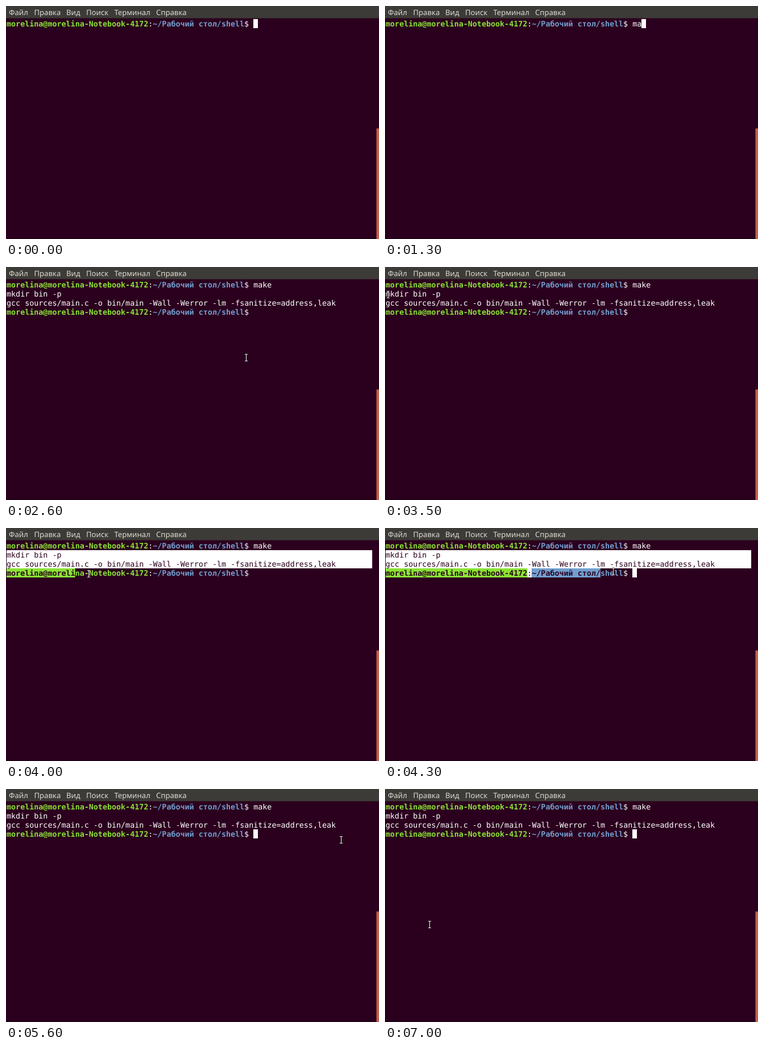
An HTML page for the animation above (7100 ms loop, 656x410 px).

```html
<!DOCTYPE html>
<html lang="ru">
<head>
<meta charset="utf-8">
<title>Терминал</title>
<style>
  html, body { margin: 0; width: 100%; height: 100%; overflow: hidden; background: #2b001e; }
  svg { display: block; }
  text { white-space: pre; text-rendering: geometricPrecision; }
  .menu { font: 13.1px "Noto Sans", "Open Sans", sans-serif; fill: #dfdbd2; }
  .term { font: 13.36px "DejaVu Sans Mono", monospace; }
  .bold { font-weight: bold; }
</style>
</head>
<body>
<svg id="stage" width="656" height="410" viewBox="0 0 656 410"></svg>
<script>
const LOOP = 7100, STEP = 100;
const CELL = 8.04, LINE = 16, ASCENT = 13, LEFT = 1, TOP = 23, COLUMNS = 80;
const BACK = '#2b001e', WHITE = '#ffffff', GREEN = '#8ae234', BLUE = '#729fcf';

const KEYS = [1100, 1300, 1400, 1600];
const ENTER = 1700, OUTPUT = 1800, DONE = 2400;
const SELECT_START = 3600, SELECT_END = 5000, SELECT_LAG = 26;
const COMMAND = 'make';
const PROMPT = [
  ['morelina@morelina-Notebook-4172', GREEN],
  [':', WHITE],
  ['~/Рабочий стол/shell', BLUE],
  ['$ ', WHITE]
];
const PROMPT_COLS = PROMPT.reduce((n, [s]) => n + s.length, 0);

// time, x, y of the mouse pointer
const POINTER = [
  [2200, 506, 240], [2300, 506, 238], [2500, 422, 160], [2800, 422, 160],
  [3300, 6, 49], [3600, 5, 49], [3900, 60, 82], [4300, 401, 77],
  [4600, 589, 84], [5000, 589, 90], [5600, 589, 90], [6000, 605, -10],
  [6700, 605, -10], [6800, 602, 8], [6900, 380, 110], [7000, 78, 239]
];

const stage = document.getElementById('stage');
const colX = col => LEFT + col * CELL;
const rowY = row => TOP + row * LINE;

function add(tag, attrs, parent = stage) {
  const node = document.createElementNS('http://www.w3.org/2000/svg', tag);
  for (const key in attrs) node.setAttribute(key, attrs[key]);
  parent.appendChild(node);
  return node;
}

function rect(x, y, width, height, fill, parent) {
  return add('rect', { x, y, width, height, fill }, parent);
}

function write(str, col, row, fill, parent, bold) {
  const node = add('text', {
    x: colX(col), y: rowY(row) + ASCENT, fill, class: bold ? 'term bold' : 'term'
  }, parent);
  node.textContent = str;
  return node;
}

function writePrompt(row, parent, inverted) {
  let col = 0;
  for (const [str, color] of PROMPT) {
    if (inverted) rect(colX(col), rowY(row), str.length * CELL, LINE, color, parent);
    write(str, col, row, inverted ? BACK : color, parent, color !== WHITE);
    col += str.length;
  }
}

function writeOutput(parent, fill) {
  write('mkdir bin -p', 0, 1, fill, parent);
  write('gcc sources/main.c -o bin/main -Wall -Werror -lm -fsanitize=address,leak', 0, 2, fill, parent);
}

function show(node, visible) {
  node.setAttribute('visibility', visible ? 'visible' : 'hidden');
}

rect(0, 0, 656, 410, BACK);
rect(0, 408, 656, 2, '#200317');
rect(651.5, 215.5, 4.5, 194.5, '#c4604a');
rect(0, 0, 656, 21.5, '#3c3b37');
[['Файл', 5], ['Правка', 49.5], ['Вид', 106], ['Поиск', 141], ['Терминал', 190.5], ['Справка', 264]]
  .forEach(([label, x]) => { add('text', { x, y: 16.4, class: 'menu' }).textContent = label; });

writePrompt(0, stage);
const typed = write('', PROMPT_COLS, 0, WHITE, stage);
const output = add('g', {});
writeOutput(output, WHITE);
const nextPrompt = add('g', {});
writePrompt(3, nextPrompt);

// Inverted copy of the text, revealed by the selection shape
const clip = add('clipPath', { id: 'selection' });
const clipShape = add('path', {}, clip);
const selected = add('g', { 'clip-path': 'url(#selection)' });
rect(LEFT, rowY(1), COLUMNS * CELL, 2 * LINE, WHITE, selected);
writeOutput(selected, BACK);
writePrompt(3, selected, true);

const caret = rect(0, 0, 8, LINE, WHITE);
const pointer = add('g', { fill: 'none' });
const BEAM = 'M-2.5-6H-1L0-5L1-6H2.5M0-5V5M-2.5 6H-1L0 5L1 6H2.5';
add('path', { d: BEAM, stroke: '#000', 'stroke-width': 2.6, 'stroke-opacity': 0.6 }, pointer);
add('path', { d: BEAM, stroke: '#f4f0f3', 'stroke-width': 1.1 }, pointer);

function pointerAt(t) {
  const next = POINTER.findIndex(p => p[0] >= t);
  if (next < 0) return POINTER[POINTER.length - 1].slice(1);
  if (next === 0) return POINTER[0].slice(1);
  const [t0, x0, y0] = POINTER[next - 1], [t1, x1, y1] = POINTER[next];
  const k = (t - t0) / (t1 - t0);
  return [x0 + (x1 - x0) * k, y0 + (y1 - y0) * k];
}

function selectionPath(t) {
  const [x, y] = pointerAt(t - SELECT_LAG);
  const endRow = Math.max(1, Math.min(3, Math.floor((y - TOP) / LINE)));
  const endCol = Math.max(0, Math.min(PROMPT_COLS, Math.round((x - LEFT) / CELL)));
  let d = '';
  for (let row = 1; row <= endRow; row++) {
    const width = (row < endRow ? COLUMNS : endCol) * CELL;
    d += `M${LEFT} ${rowY(row)}h${width}v${LINE}h${-width}z`;
  }
  return d;
}

function caretCell(t, count) {
  if (t < ENTER) return [PROMPT_COLS + count, 0];
  if (t < OUTPUT) return [0, 1];
  return t < DONE ? [0, 3] : [PROMPT_COLS, 3];
}

function draw(t) {
  const count = KEYS.filter(key => key <= t).length;
  typed.textContent = COMMAND.slice(0, count);
  show(output, t >= OUTPUT);
  show(nextPrompt, t >= DONE);

  const selecting = t >= SELECT_START && t < SELECT_END;
  show(selected, selecting);
  if (selecting) clipShape.setAttribute('d', selectionPath(t));

  // Blinking restarts at every key press
  const lastKey = Math.max(0, ...[...KEYS, ENTER].filter(key => key <= t));
  const [col, row] = caretCell(t, count);
  caret.setAttribute('x', Math.round(colX(col)));
  caret.setAttribute('y', rowY(row));
  show(caret, (t - lastKey) % 1200 < 600);

  const [x, y] = pointerAt(t);
  pointer.setAttribute('transform', `translate(${Math.round(x) + 0.5} ${Math.round(y) - 0.5})`);
  show(pointer, t >= POINTER[0][0]);
}

const start = performance.now();
function tick() {
  const elapsed = Math.max(0, performance.now() - start) % LOOP;
  draw(Math.floor(elapsed / STEP) * STEP);
  requestAnimationFrame(tick);
}
tick();
</script>
</body>
</html>
```
